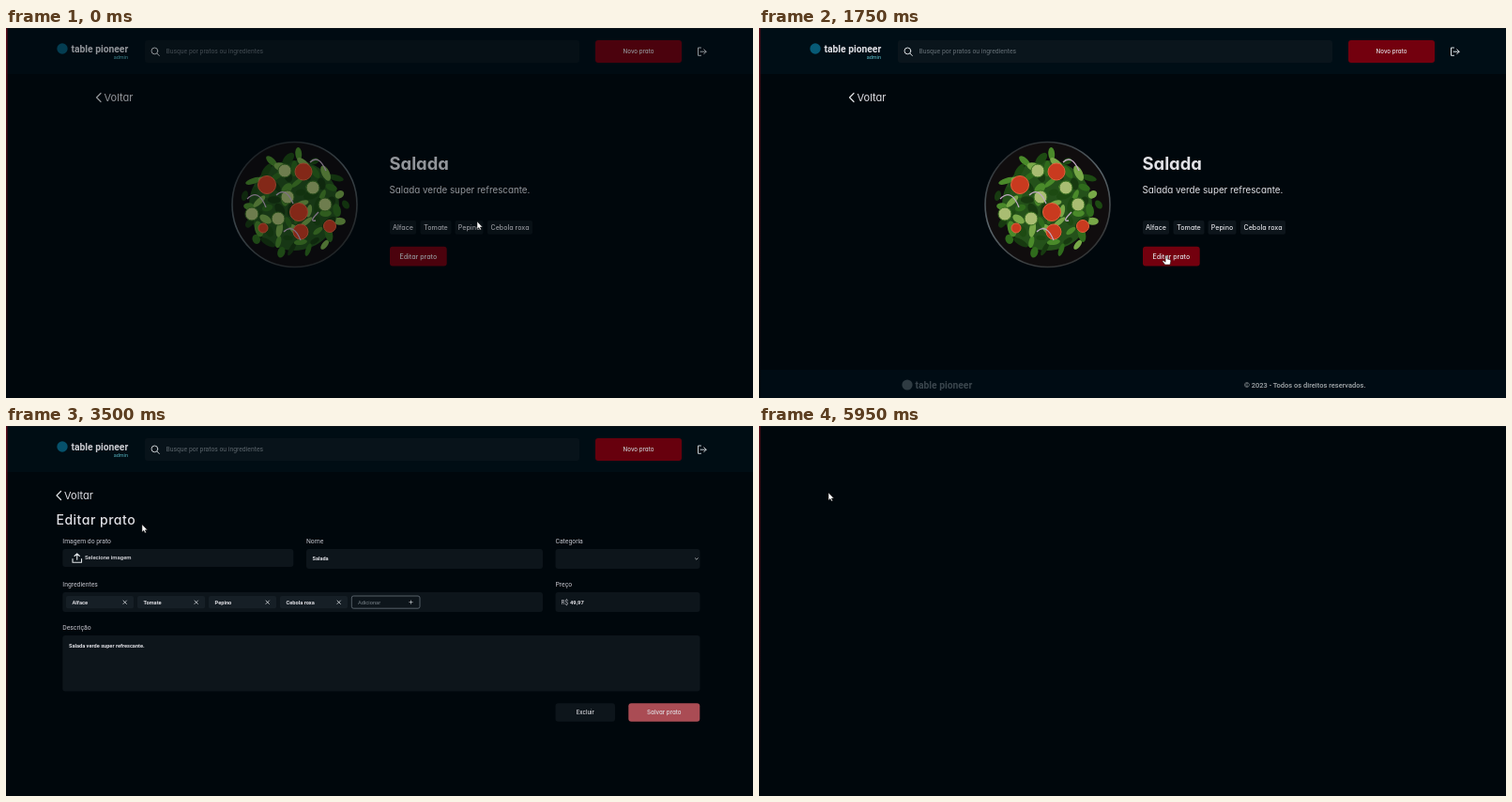
An HTML page that plays this animation: 796x394 px, repeating every 6000 ms.

```html
<!DOCTYPE html>
<html lang="pt-BR">
<head>
<meta charset="utf-8">
<title>Editar prato</title>
<style>
html, body { margin: 0; width: 100%; height: 100%; overflow: hidden; background: #00070c; }
svg { display: block; width: 796px; height: 394px; }
text { font-family: Roboto, sans-serif; fill: #e1e1e6; }
.geo { font-family: Inter, sans-serif; font-feature-settings: "cv11"; }
.med { font-weight: 500; }
.bold { font-weight: 700; }
.mid { text-anchor: middle; }
.end { text-anchor: end; }
.line { fill: none; stroke: #dfe3e6; stroke-linecap: round; stroke-linejoin: round; }
</style>
</head>
<body>
<svg viewBox="0 0 796 394">
  <defs>
    <linearGradient id="edge" x1="0" y1="0" x2="0" y2="1">
      <stop offset="0" stop-color="#5c0b19"/>
      <stop offset=".55" stop-color="#350812"/>
      <stop offset="1" stop-color="#00070c"/>
    </linearGradient>
    <linearGradient id="rim" x1="0" y1="0" x2=".5" y2="1">
      <stop offset="0" stop-color="#1b1d1f"/>
      <stop offset=".55" stop-color="#5b666c"/>
      <stop offset="1" stop-color="#343637"/>
    </linearGradient>
  </defs>
  <g id="header"></g>
  <g id="detail"></g>
  <g id="form"></g>
  <g id="footer"></g>
  <rect width="796" height="1" fill="#0a1217"/>
  <rect width="1.5" height="394" fill="url(#edge)"/>
  <g id="cursor">
    <path id="arrow" d="M0 0V8.2L1.9 6.5 3.1 9.1 4.5 8.5 3.3 6H5.8Z" fill="#fff" stroke="#111" stroke-width=".5"/>
    <path id="hand" d="M-.9 .8Q0-.6 .9 .8V4L3.9 4.6Q5 5 4.8 6.3L4 10H-1.4L-4 6.4Q-3.7 5.2-2.4 6L-.9 7.2Z" fill="#fff" stroke="#111" stroke-width=".5"/>
    <path id="beam" class="line" d="M-1.7-3.5H1.7M0-3.5V3.5M-1.7 3.5H1.7" stroke-width=".9"/>
  </g>
</svg>
<script>
const $ = id => document.getElementById(id);
const FIELD = '#0d151b', RED = '#73000e', TEAL = '#075a76';

const text = (x, y, size, str, cls = '', fill = '') =>
  `<text x="${x}" y="${y}" font-size="${size}" class="${cls}"${fill && ` style="fill:${fill}"`}>${str}</text>`;
const box = (x, y, w, h, fill = FIELD, r = 3, extra = '') =>
  `<rect x="${x}" y="${y}" width="${w}" height="${h}" rx="${r}" fill="${fill}" ${extra}/>`;
const dot = (x, y, r, fill, extra = '') => `<circle cx="${x}" cy="${y}" r="${r}" fill="${fill}" ${extra}/>`;
const line = (d, width = 1) => `<path class="line" d="${d}" stroke-width="${width}"/>`;
const button = (x, y, w, h, size, str, fill) =>
  box(x, y, w, h, fill) + text(x + w / 2, y + h / 2 + size * .36, size, str, 'geo med mid');
const back = x => line(`M${x + 4.5} 69.5l-4.5 4.5 4.5 4.5`, 1.2) + text(x + 8, 77.5, 11, 'Voltar', 'geo');

function salad() {
  let seed = 11, out = dot(307.5, 188, 66.5, '#100d0e', 'stroke="url(#rim)" stroke-width="1.6"');
  const rnd = () => (seed = seed * 16807 % 2147483647) / 2147483647;
  const greens = ['#1d4a12', '#2f6b1c', '#4a8a2a', '#78a848', '#173a10'];
  out += dot(307, 189, 48, '#24511a');
  for (let i = 0; i < 70; i++) {
    const a = i * 2.4, r = 55 * Math.sqrt((70 - i) / 70);
    const x = 307 + r * Math.cos(a), y = 188 + r * Math.sin(a);
    out += `<ellipse cx="${x}" cy="${y}" rx="${5 + 4 * rnd()}" ry="${2.5 + 2 * rnd()}" fill="${greens[i % 5]}" transform="rotate(${rnd() * 180} ${x} ${y})"/>`;
  }
  for (const [x, y] of [[297, 152], [290, 203], [262, 198], [340, 188], [300, 180], [327, 170]])
    out += dot(x, y, 7, '#a9bd72', 'stroke="#386f20" stroke-width="1"');
  for (const [x, y, r] of [[278, 167, 9.5], [317, 153, 9], [312, 196, 9.5], [314, 217, 8], [345, 211, 6.5], [274, 213, 5]])
    out += dot(x, y, r, '#c93a1f', 'stroke="#e0623c" stroke-width="1"');
  for (const [x, y, b] of [[257, 182, 12], [288, 178, 10], [324, 143, 9], [333, 196, -11], [296, 217, 10]])
    out += `<path d="M${x} ${y}q${b} ${-b} ${b + 8} 9" fill="none" stroke="#c3a9c4" stroke-width="1.3"/>`;
  return out;
}

$('header').innerHTML =
  box(0, 0, 796, 49, '#000e16', 0) +
  dot(60, 22, 5.7, TEAL) +
  text(69.5, 25.7, 10.3, 'table pioneer', 'bold') +
  text(130, 33, 5.5, 'admin', 'end', '#5fc4d0') +
  box(148, 13, 463, 24, '#0a151c') +
  line('M161 27.2l2.3 2.3M161.8 24.4a3.4 3.4 0 1 1-6.8 0a3.4 3.4 0 1 1 6.8 0') +
  text(170.5, 27.4, 6.8, 'Busque por pratos ou ingredientes', '', '#667077') +
  button(628, 13, 92, 24, 6.2, 'Novo prato', RED) +
  line('M740.5 21H737.5V29.3H740.5M740 25.2H746M743.8 22.8l2.3 2.4-2.3 2.4');

const tags = [['Alface', 409, 28], ['Tomate', 441.5, 33], ['Pepino', 478.5, 30], ['Cebola roxa', 513, 48]];
$('detail').innerHTML =
  back(96.5) + salad() +
  text(408.5, 150.5, 18.4, 'Salada', 'geo bold') +
  text(408.5, 176, 9.8, 'Salada verde super refrescante.', 'geo') +
  tags.map(([name, x, w]) => box(x, 205, w, 14.7, FIELD, 2) + text(x + w / 2, 215, 7.1, name, 'geo med mid')).join('') +
  button(409, 232.7, 60.7, 20.8, 7.1, 'Editar prato', RED);

const label = (x, y, str) => text(x, y, 6.8, str, '', '#c4c4cc');
$('form').innerHTML =
  back(54) +
  `<g letter-spacing=".5">${text(53.5, 104.7, 14, 'Editar prato', 'geo med')}</g>` +
  label(60.3, 124.7, 'Imagem do prato') + label(320, 124.7, 'Nome') + label(585.5, 124.7, 'Categoria') +
  label(60.3, 171, 'Ingredientes') + label(585.5, 171, 'Preço') + label(60.3, 217.3, 'Descrição') +
  box(60.3, 131, 246, 19) + box(320, 131, 252, 21) + box(585.5, 131, 154, 21) +
  box(60.3, 177, 511.7, 21) + box(585.5, 177, 154, 21) + box(60.3, 223, 679.2, 59.5) +
  line('M71 141.5V145.2H80.5V141.5M75.7 142.3V136M73 138.5l2.7-2.7 2.7 2.7', 1.1) +
  text(84, 142.3, 6, 'Selecione imagem', 'med') +
  text(326.5, 143.4, 5.6, 'Salada', 'bold') +
  line('M734.4 140.8l1.4 1.4 1.4-1.4', .7) +
  tags.map(([name], i) => {
    const x = 64 + 76 * i;
    return box(x, 181, 72, 13.2, '#161f26', 2) + text(x + 6.5, 189.5, 5.7, name, 'bold') +
      line(`M${x + 61} 186l3.4 3.4m0-3.4l-3.4 3.4`, .8);
  }).join('') +
  box(368.3, 181, 72.7, 13.2, 'none', 2, 'stroke="#67727a" stroke-width=".8"') +
  text(375, 189.5, 5.7, 'Adicionar', '', '#7c858c') +
  line('M429.8 187.6h3.4m-1.7-1.7v3.4', .6) +
  text(591.5, 189.8, 6.3, 'R$', '', '#c4c4cc') + text(601, 189.8, 5.8, '49,97', 'bold') +
  text(67, 235.7, 5.65, 'Salada verde super refrescante.', 'bold') +
  button(585.5, 295.3, 63.5, 19.4, 5.9, 'Excluir', FIELD) +
  button(663.3, 295.3, 76, 19.4, 6.2, 'Salvar prato', '#aa4c54');

$('footer').innerHTML =
  box(0, 364, 796, 30, '#000e16', 0) +
  dot(158, 380, 5.6, '#38464d') +
  text(166.5, 383.7, 10.3, 'table pioneer', 'bold', '#46525a') +
  text(517, 382.6, 7.5, '© 2023 - Todos os direitos reservados.', 'med', '#c4c8cb');

// cubic-bezier(.5, 0, 0, 1)
function reveal(ms) {
  const x = Math.min(1, Math.max(0, ms / 2000));
  let lo = 0, hi = 1;
  for (let i = 0; i < 24; i++) {
    const s = (lo + hi) / 2;
    if (1.5 * s * (1 - s) ** 2 + s ** 3 < x) lo = s; else hi = s;
  }
  return 3 * hi * hi * (1 - hi) + hi ** 3;
}

const path = [
  [0, 502, 206], [400, 448, 200], [650, 434, 238], [800, 434, 238], [1300, 434, 242],
  [2350, 434, 242], [2450, 435, 243], [3000, 435, 243], [3700, 74, 71], [6000, 74, 71]
];
function pointer(t) {
  const i = path.findIndex(p => p[0] > t);
  const [t0, x0, y0] = path[i - 1], [t1, x1, y1] = path[i];
  const u = (t - t0) / (t1 - t0), k = u * u * (3 - 2 * u);
  return [x0 + (x1 - x0) * k, y0 + (y1 - y0) * k];
}

const show = (id, opacity) => $(id).setAttribute('opacity', opacity);

function draw(now) {
  const t = now % 6000;
  const detail = t < 2350, form = t >= 2450 && t < 5900;
  const age = detail ? t + 720 : form ? t - 2380 : 0;
  const [x, y] = pointer(t);
  const hand = detail ? y > 232 : form && x < 95;
  const beam = form && y > 223;
  show('header', reveal(age));
  show('detail', detail ? reveal(age) : 0);
  show('form', +form);
  show('footer', reveal(age - 1500));
  $('cursor').setAttribute('transform', `translate(${x} ${y})`);
  show('hand', +hand);
  show('beam', +beam);
  show('arrow', +!(hand || beam));
}

const start = performance.now();
function tick() {
  draw(performance.now() - start);
  requestAnimationFrame(tick);
}
tick();
</script>
</body>
</html>
```
